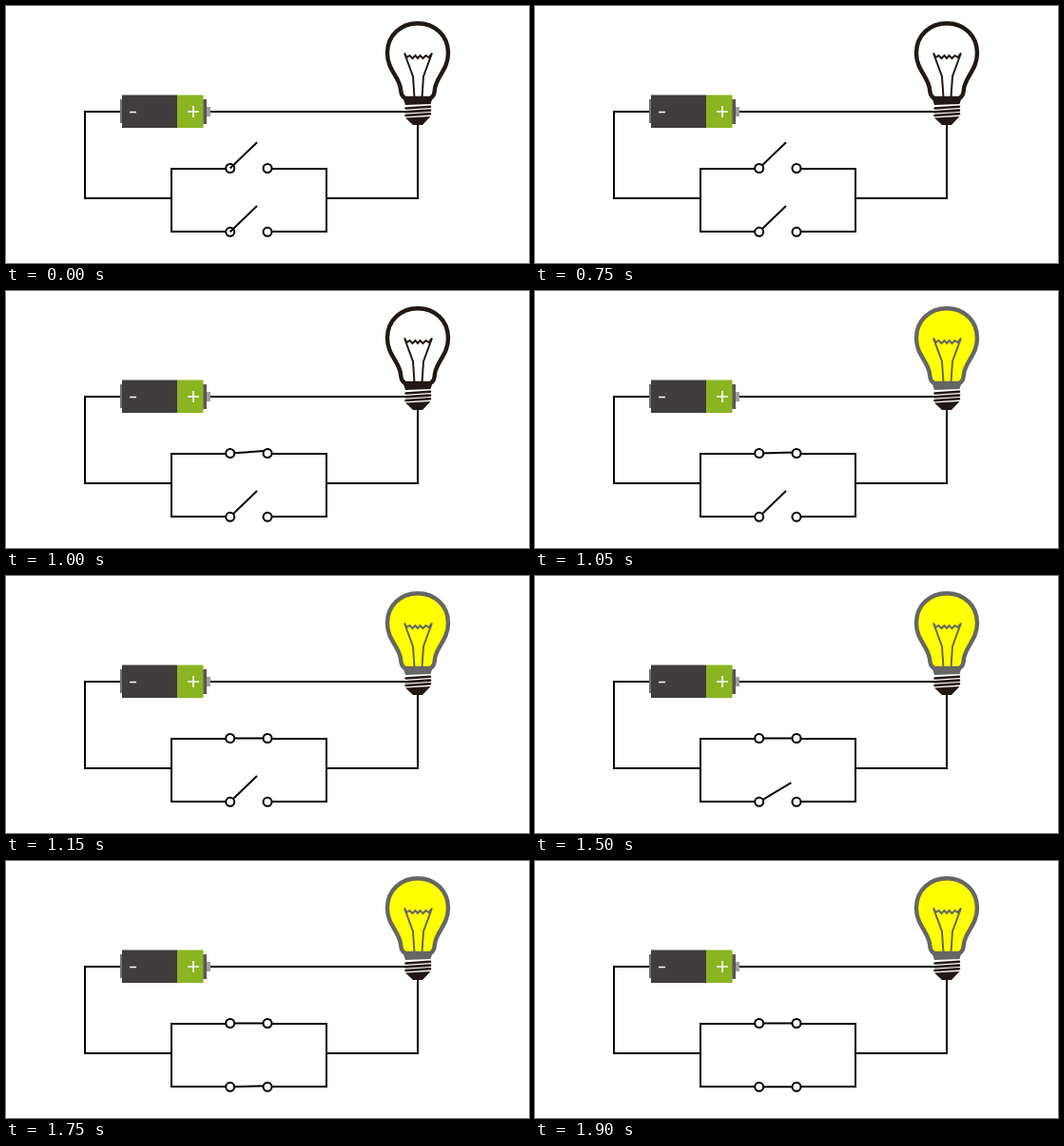
These frames come from a looping animation (550x270 px, 2.75 s). An HTML page:

```html
<!DOCTYPE html>
<html lang="en">
<head>
<meta charset="utf-8">
<title>Parallel switch circuit</title>
<style>
  html, body { margin: 0; width: 100%; height: 100%; overflow: hidden; background: #fff; }
  svg { display: block; width: 550px; height: 270px; }
  .line { fill: none; stroke: #000; stroke-width: 2; }
  .contact { fill: #fff; stroke: #000; stroke-width: 2; }
  .bare .contact { fill: none; }
  #bulb { --ink: #231815; --glass: #fff; }
  #bulb.on { --ink: #666; --glass: #ff0; }
  .glass { fill: var(--glass); stroke: var(--ink); stroke-width: 4.4; }
  .filament { fill: none; stroke: var(--ink); stroke-width: 2; }
  .collar { fill: var(--ink); }
</style>
</head>
<body>
<svg viewBox="0 0 550 270">
  <path class="line" d="M120 111H83V202H174M231 171H174V237H231M280 171H337V237H280M337 202H433V122M215 111H421"/>

  <g id="battery">
    <path fill="#727171" d="M120 98h3v25h-3z"/>
    <path fill="#595757" d="M207 98h4v26h-4z"/>
    <path fill="#9fa0a0" d="M211 106h4v10h-4z"/>
    <path fill="#403d3e" d="M122 93.5h58V128h-58z"/>
    <path fill="#8ab422" d="M180 93.5h27.5V128H180z"/>
    <path fill="none" stroke="#fff" stroke-width="1.6" d="M130 111.5h7M191 111h12M197 105v12"/>
  </g>

  <g id="bulb">
    <path class="glass" d="M420 97C416 95 415.500 92 415 87C413.500 74 401 67 401 49.500C401 31 415 18.200 433 18.200S465 31 465 49.500C465 67 452.500 74 451 87C450.500 92 450 95 446 97Z"/>
    <path class="filament" d="M429.500 96L428 74L419 49.500L421.500 54L424.500 52L427.500 55L430.500 52L433 55L435.500 52L438.500 55L441.500 52L444.500 54L448 49.500L439 74L437.500 96"/>
    <path class="collar" d="M417 95H449L446.500 103L420 104Z"/>
    <path fill="none" stroke="#231815" stroke-width="2.6" stroke-linecap="round" d="M420.500 107.500L446 105.800M420.500 111.300L446 109.600M420.500 115L446 113.300"/>
    <path fill="#231815" d="M420 117.500L446.500 116L438 125H428Z"/>
  </g>

  <g id="switches">
    <path class="line"/>
    <path class="line"/>
    <g class="contact">
      <circle cx="235.700" cy="170.500" r="4.500"/><circle cx="275" cy="170.500" r="4.500"/>
      <circle cx="235.700" cy="237.300" r="4.500"/><circle cx="275" cy="237.300" r="4.500"/>
    </g>
  </g>
</svg>
<script>
  const LOOP = 2750, STEP = 50, CLOSING = 450, OPEN_ANGLE = 44;
  const switches = document.getElementById('switches');
  const bulb = document.getElementById('bulb');
  const levers = switches.querySelectorAll('.line');

  function setLever(lever, y, elapsed) {
    const p = Math.min(1, Math.max(0, elapsed / CLOSING));
    const angle = OPEN_ANGLE * (1 - p) ** 3 * Math.PI / 180;
    const dx = 39.3 * Math.cos(angle), dy = -39.3 * Math.sin(angle);
    lever.setAttribute('d', `M235.700 ${y}l${dx} ${dy}`);
  }

  function draw(now) {
    const t = Math.floor(now % LOOP / STEP) * STEP;
    setLever(levers[0], 170.5, t - 750);
    setLever(levers[1], 237.3, t - 1450);
    switches.classList.toggle('bare', t < 750);
    bulb.classList.toggle('on', t >= 1050);
  }

  const start = performance.now();
  function tick() {
    draw(performance.now() - start);
    requestAnimationFrame(tick);
  }
  tick();
</script>
</body>
</html>
```
